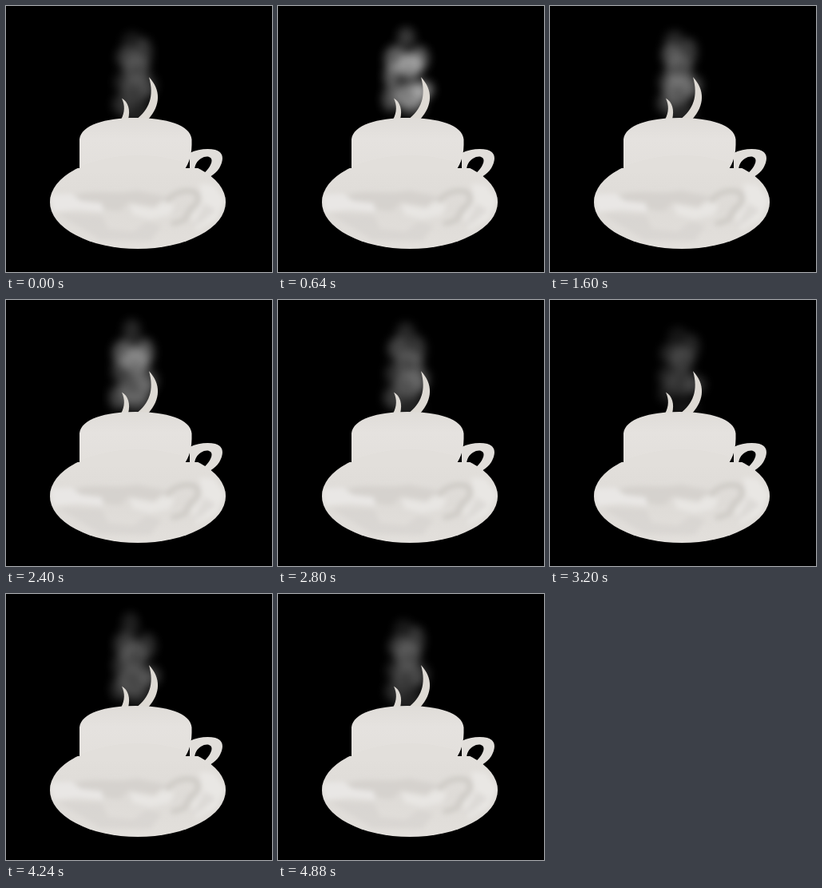
An HTML page for the animation above (4.96 s loop, 333 px wide and 333 px high).

```html
<!DOCTYPE html>
<html lang="en">
<head>
<meta charset="utf-8">
<title>Steaming cup</title>
<style>
html, body { margin: 0; width: 100%; height: 100%; overflow: hidden; background: #000; }
svg { display: block; width: 100vw; height: 100vh; }
</style>
</head>
<body>
<svg viewBox="0 0 333 333">
  <defs>
    <filter id="soft" x="-50%" y="-50%" width="200%" height="200%"><feGaussianBlur stdDeviation="6"/></filter>
    <filter id="smudge" x="-50%" y="-50%" width="200%" height="200%"><feGaussianBlur stdDeviation="3"/></filter>
    <linearGradient id="body" x1="0" y1="0" x2="0" y2="1">
      <stop offset="0" stop-color="#dfdcd8"/>
      <stop offset=".35" stop-color="#e5e2df"/>
      <stop offset="1" stop-color="#e2dfdb"/>
    </linearGradient>
    <linearGradient id="dish" x1="0" y1="0" x2="0" y2="1">
      <stop offset="0" stop-color="#e2dfdb"/>
      <stop offset=".5" stop-color="#dedbd7"/>
      <stop offset="1" stop-color="#e3e0dc"/>
    </linearGradient>
    <clipPath id="dishClip"><ellipse cx="165" cy="245.5" rx="110" ry="58.5"/></clipPath>
    <clipPath id="air"><rect x="120" y="10" width="85" height="133"/></clipPath>
  </defs>
  <rect width="333" height="333"/>
  <g clip-path="url(#air)"><g id="steam" fill="#fff" filter="url(#soft)"></g></g>
  <g fill="#dedad4">
    <path d="M145 115.500C153 120 156 130 153 142H144C149 133 149 124 145 115.500Z"/>
    <path d="M179 89C194 105 194 124 178 142H163C179 130 186 113 179 89Z"/>
  </g>
  <path fill="#e1deda" fill-rule="evenodd" d="M230 184C240 179 253 178 262 180C273 183 273 193 267 203C261 212 253 216 244 216L230 212ZM236 207C236 199 239 194 244 191C250 187 257 188 257.500 193C258 199 250 209 243 213Z"/>
  <path fill="url(#body)" d="M92 215V167C94 149 124 140 162 140C201 140 231 149 232.500 167C233 186 230 196 222 207V215Z"/>
  <g clip-path="url(#dishClip)">
    <rect x="50" y="203" width="230" height="105" fill="url(#dish)"/>
    <path fill="#e2dfdb" d="M92 187H224L222 209H92Z"/>
    <g filter="url(#smudge)">
      <path fill="#d5d2ce" d="M82 239C105 227 135 238 163 231L202 239L186 251L154 246L142 257L104 251Z"/>
      <path fill="#e9e7e5" d="M55 236L82 235L94 244L120 247L122 258L88 255L58 258Z"/>
      <path fill="#d3d0cc" d="M66 260L120 262L128 279L160 282L176 270L195 275L181 294L118 293Z" opacity=".55"/>
      <path fill="#e8e6e3" d="M155 248L185 254L202 241L211 250L205 262L180 267L158 261Z"/>
      <path fill="none" stroke="#cfccc7" stroke-width="7" d="M201 246C207 234 224 229 236 233C245 239 239 249 231 254L223 268L207 273"/>
      <path fill="#e9e7e4" d="M242 222L260 224L275 243L264 267L238 281L232 264L246 246Z"/>
      <path fill="#d5d2ce" d="M249 247L263 256L244 272L231 278Z" opacity=".6"/>
    </g>
  </g>
</svg>
<script>
const LOOP = 4960, STEP = 80;
const steam = document.getElementById('steam');
// x, y, rx, ry, opacity
const puffs = [
  [158, 42, 12, 14, .25], [150, 65, 14, 15, .46], [175, 62, 11, 17, .42],
  [163, 77, 16, 18, .58], [145, 92, 11, 14, .36], [179, 102, 13, 13, .42],
  [163, 108, 19, 18, .52], [143, 120, 11, 14, .37], [166, 132, 18, 12, .26]
];
const glow = [
  [0, .43], [320, .62], [640, .9], [960, .78], [1600, .57], [2080, .54],
  [2400, .67], [2800, .53], [3200, .37], [3680, .38], [4240, .48], [4880, .44], [4960, .43]
];

const nodes = puffs.map(() => {
  const node = document.createElementNS('http://www.w3.org/2000/svg', 'ellipse');
  return steam.appendChild(node);
});

function level(t) {
  const i = glow.findIndex(k => k[0] > t);
  const [t0, a] = glow[i - 1], [t1, b] = glow[i];
  const p = (t - t0) / (t1 - t0);
  return a + (b - a) * p * p * (3 - 2 * p);
}

function draw(time) {
  const t = Math.floor((time % LOOP) / STEP) * STEP;
  const angle = t / LOOP * Math.PI * 2;
  steam.setAttribute('opacity', level(t));
  puffs.forEach(([x, y, rx, ry, alpha], i) => {
    const sway = Math.sin(angle * (2 + i % 3) + i * 2.1);
    const lift = Math.cos(angle * (3 + i % 2) + i * 1.7);
    const values = {
      cx: x + sway * 2.5, cy: y + lift * 4,
      rx: rx + lift, ry: ry - sway * 1.5,
      opacity: alpha * (1 + .14 * Math.sin(angle * 4 + i))
    };
    for (const key in values) nodes[i].setAttribute(key, values[key]);
  });
}

const start = performance.now();
function tick() {
  draw(performance.now() - start);
  requestAnimationFrame(tick);
}
tick();
</script>
</body>
</html>
```
